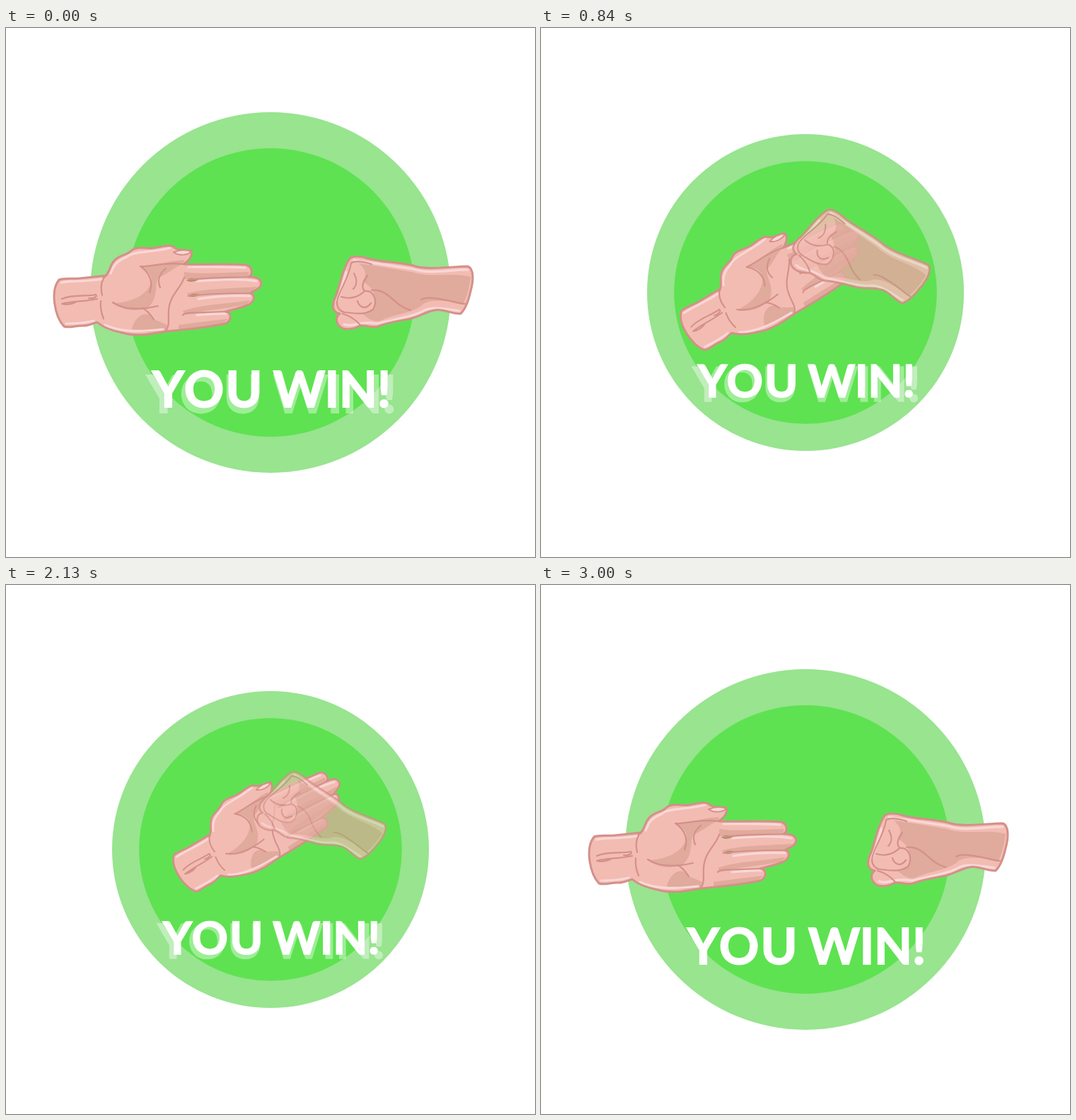
Animation, 748 px wide and 748 px high, one loop 3030 ms. Source, as an HTML page:

```html
<!DOCTYPE html>
<html lang="en">
<head>
<meta charset="utf-8">
<title>You win</title>
<style>
html, body { margin: 0; width: 100%; height: 100%; overflow: hidden; background: #fff; }
svg { display: block; width: 100vw; height: 100vh; }
text { font: 700 70px Lato, "Open Sans", sans-serif; fill: #fff; stroke: #fff; stroke-width: 1.8; text-anchor: middle; }
.skin { fill: #f2bcb3; }
.edge { fill: none; stroke: #d49089; stroke-width: 3; }
.line { fill: none; stroke: #d49089; stroke-width: 2.2; }
.shade { fill: #e0aa9c; }
.light { fill: none; stroke: #f8d8d7; stroke-width: 3.2; }
.nail { fill: #f8d8d7; stroke: #d49089; stroke-width: 2; }
.gap { fill: #b08a62; }
path { stroke-linecap: round; stroke-linejoin: round; }
</style>
</head>
<body>
<svg viewBox="0 0 748 748">
  <circle id="ring" cx="374" cy="374" fill="#98e48f"/>
  <circle id="disc" cx="374" cy="374" fill="#5ee251"/>
  <g id="palm"></g>
  <g id="fist"></g>
  <g id="shadow" opacity=".4"></g>
  <g id="title"></g>
</svg>
<script>
const LOOP = 3030, STEP = 31.25, LAST = 95;
const el = id => document.getElementById(id);
const paths = list => list.map(([kind, d]) => `<path class="${kind}" d="${d}"/>`).join("");

const armShape = "M75 356C82 353 92 355 104 354L142 350L140 418C128 412 122 421 110 421C100 420 90 425 82 422C69 408 62 372 75 356Z";
const palmOutline = "M138 353C148 346 145 338 153 329C160 321 172 321 177 315C186 307 198 313 210 311C222 309 232 305 239 311C243 315 252 313 262 315C264 322 259 329 251 334C280 335 310 333 340 335C349 338 349 349 343 352C356 351 363 357 360 364C358 370 350 371 345 375C354 377 351 388 341 392C330 396 318 399 310 401C320 402 319 414 310 418C290 422 250 427 226 429C210 432 185 437 165 431C150 428 138 424 129 416";
const palmShape = palmOutline + "C133 405 132 380 138 353Z";
const fistShape = "M486 326C492 321 502 323 512 326C530 331 555 331 576 336C595 343 630 337 653 337C662 340 661 358 657 372C654 386 649 398 643 404C630 405 618 396 606 399C594 401 585 408 572 411C556 414 540 416 526 422C515 425 508 419 500 421C492 426 478 428 472 422C466 416 466 408 472 404C461 402 461 392 465 382C472 368 474 343 486 326Z";

el("palm").innerHTML = paths([
  ["skin", armShape],
  ["light", "M78 360C92 357 115 359 136 355M85 418C98 418 112 417 124 414"],
  ["edge", armShape],
  ["skin", palmShape],
  ["shade", "M189 337C208 339 226 329 252 328L250 334C238 338 230 347 216 353C209 362 217 380 201 395C182 403 164 398 150 389C174 389 202 379 206 356C205 347 199 341 189 337Z"],
  ["shade", "M178 426C182 408 198 396 210 412L228 420L226 427C210 431 192 432 178 426Z"],
  ["shade", "M252 345C280 349 312 345 344 345L342 351C310 352 280 355 252 355Z"],
  ["shade", "M256 375C285 368 320 368 356 366L344 374C315 374 285 378 257 380Z"],
  ["shade", "M250 400C280 390 315 390 346 385L340 391C310 397 280 400 252 404Z"],
  ["shade", "M244 420C270 416 292 414 314 411L308 417C285 421 265 425 244 426Z"],
  ["light", "M148 347C152 336 156 330 170 324C180 315 205 318 232 311M258 338C285 338 318 337 338 339M270 358C300 356 330 354 354 358M272 383C300 379 325 378 345 379M270 406C285 405 298 403 311 404M140 420C158 428 180 431 222 426"],
  ["edge", palmOutline],
  ["gap", "M255 357C260 352 266 354 272 356C266 359 260 360 255 357ZM258 379C264 374 270 376 274 377C268 381 262 381 258 379Z"],
  ["line", "M258 356C290 352 318 353 343 352M258 379C285 376 318 375 345 375M250 406C252 401 280 403 310 401"],
  ["line", "M252 353C246 370 231 378 230 400C229 413 232 420 226 428M190 337C204 338 226 330 250 334M190 337C205 347 208 361 203 374M226 340C216 348 214 358 218 367M151 388C170 401 198 397 215 393M193 396C200 399 205 406 209 412"],
  ["nail", "M237 317C244 314 254 313 262 316C258 321 245 323 237 317Z"],
  ["line", "M138 354C134 361 134 370 136 378M134 386C133 396 135 404 138 411M79 383C94 376 116 380 127 377C130 380 124 383 117 382M79 390C94 386 112 387 129 383M79 390C86 392 92 391 98 388"]
]);

el("fist").innerHTML = paths([
  ["skin", fistShape],
  ["shade", "M499 333C530 337 550 341 574 345C600 354 630 345 657 352C655 368 651 382 646 391C625 386 606 382 590 390C578 404 550 403 530 414C518 417 510 409 504 404L519 397C528 382 518 366 504 358C512 348 507 340 499 333Z"],
  ["light", "M492 328C525 334 555 337 576 341C600 349 632 341 653 342M478 419C490 424 500 413 524 418C546 412 574 409 588 401C602 392 625 398 641 400M481 345C477 360 473 375 468 386"],
  ["edge", fistShape],
  ["line", "M488 332C496 328 508 331 517 334M488 332C486 350 474 366 469 383C466 392 470 400 479 402C492 403 507 407 519 398M474 380C485 384 498 381 507 372M492 347C497 356 496 364 491 369M507 372C501 365 506 358 511 350M507 372C520 370 526 386 519 398M497 386C499 394 508 400 516 389M476 404C486 407 495 413 501 420M517 371C535 368 548 386 556 391C562 396 567 397 572 399M587 384C596 379 611 383 624 385C634 387 642 390 649 390"]
]);

const letters = '<text x="229.5 280 336.5 366 414.5 461 498 534.5" y="536">YOU WIN!</text>';
el("title").innerHTML = el("shadow").innerHTML = letters;

const sine = p => (1 - Math.cos(Math.PI * p)) / 2;

// Each row: step, then the values reached at that step.
function track(rows, step, ease) {
  const next = rows.findIndex(row => row[0] > step);
  if (next < 0) return rows[rows.length - 1].slice(1);
  const a = rows[next - 1], b = rows[next];
  const p = ease((step - a[0]) / (b[0] - a[0]));
  return a.slice(1).map((v, i) => v + (b[i + 1] - v) * p);
}

// step, centre x, centre y, rotation, scale
const palmMoves = [
  [0, 186.7, 367.7, 0, 1], [17, 320.5, 346.5, -24.6, 1], [27, 300, 366, -24.8, .958],
  [42, 331, 350, -25, .895], [72, 332.3, 349.7, -25, .895], [LAST, 186.7, 367.7, 0, 1]
];
const fistMoves = [
  [0, 597, 356, 0, 1], [17, 498.4, 328.3, 24.6, 1], [27, 490.5, 328.6, 24.9, .965],
  [42, 482.4, 331.3, 25.4, .895], [72, 482.4, 331.3, 25.4, .895], [LAST, 597, 356, 0, 1]
];
const fistFade = [[0, 1], [17, 1], [42, .72], [68, .72], [84, .97], [LAST, 1]];

function place(id, moves, step) {
  const [x, y, turn, size] = track(moves, step, sine);
  const [, px, py] = moves[0];
  el(id).setAttribute("transform", `translate(${x} ${y}) rotate(${turn}) scale(${size}) translate(${-px} ${-py})`);
}

function zoom(id, k) {
  el(id).setAttribute("transform", `translate(374 374) scale(${k}) translate(-374 -374)`);
}

function draw(time) {
  const step = Math.floor((time % LOOP + 5) / STEP);
  const shrink = sine(2 * Math.min(step, LAST) / LAST);
  const inner = 204 - 30 * shrink;
  el("disc").setAttribute("r", inner);
  el("ring").setAttribute("r", inner * (1.25 - .073 * shrink));
  zoom("title", inner / 204);
  zoom("shadow", inner / 204 * 1.047);
  el("shadow").style.display = step > LAST ? "none" : "";
  place("palm", palmMoves, step);
  place("fist", fistMoves, step);
  el("fist").setAttribute("opacity", track(fistFade, step, p => p)[0]);
}

const start = performance.now();
function tick() {
  draw(performance.now() - start);
  requestAnimationFrame(tick);
}
tick();
</script>
</body>
</html>
```
